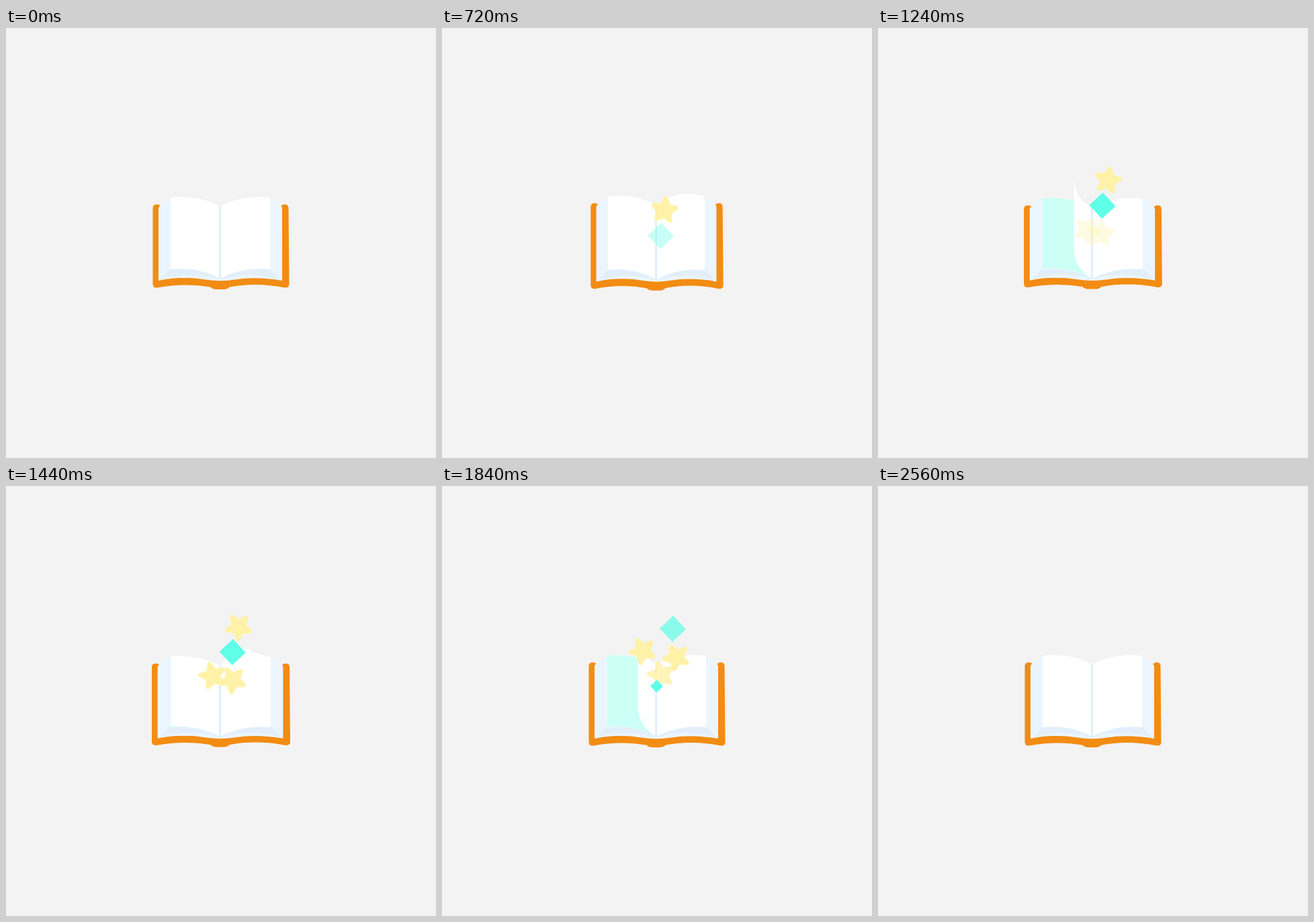
An HTML page with a canvas that plays this animation: 640x640 px, repeating every 2640 ms.

```html
<!DOCTYPE html>
<html lang="en">
<head>
<meta charset="utf-8">
<title>Magic book</title>
<style>
html, body { margin: 0; width: 100%; height: 100%; overflow: hidden; background: #f3f3f3; }
canvas { display: block; width: 640px; height: 640px; }
</style>
</head>
<body>
<canvas id="stage" width="640" height="640"></canvas>
<script>
const ctx = document.getElementById('stage').getContext('2d');
const LOOP = 2640, STEP = 40;
const MID = 319, HALF = 74;
const YELLOW = '#fff2a8', TEAL = [95, 255, 232], MINT = [204, 255, 246];

const clamp = v => Math.min(1, Math.max(0, v));
const ramp = (t, a, b) => clamp((t - a) / (b - a));
const smooth = u => u * u * (3 - 2 * u);
const mix = (a, b, u) => a + (b - a) * u;
const rgb = (a, b, u) => `rgb(${a.map((v, i) => Math.round(mix(v, b[i], u)))})`;

function fill(d, color, alpha = 1) {
  ctx.globalAlpha = alpha;
  ctx.fillStyle = color;
  ctx.fill(new Path2D(d));
  ctx.globalAlpha = 1;
}

// Squash and stretch: time, horizontal scale
const bounce = [[200, 1], [540, .89], [900, 1.054], [1180, 1.017], [1380, 1], [1500, 1.03], [1860, 1]];

function stretch(t) {
  for (let i = 1; i < bounce.length; i++) {
    const [t0, a] = bounce[i - 1], [t1, b] = bounce[i];
    if (t < t1) return mix(a, b, smooth(ramp(t, t0, t1)));
  }
  return 1;
}

const cover = 'M218.5 268Q218.5 262.5 224.5 262.5Q229 262.5 230.5 266V372H409V266Q410.5 262.5 415 262.5' +
  'Q420.5 262.5 420.5 268L421.5 381Q421.5 387 415 386.5Q372 378 333 385.5Q329 389 325 389H313Q308 389 304 385.5' +
  'Q266 379 225 386.5Q218.5 387 218.5 381Z';
const block = 'M227 269Q227 265 231 264Q237 256 245 253L319 266L393 253Q402 257 407 264Q411 265 411 269V376' +
  'Q372 369.5 341 374.5Q319 378 297 374.5Q264 368.5 227 376Z';
const shade = 'M230 374Q237 367 245 358Q288 354 319 373Q350 354 393 358Q401 367 408 374Q360 361 319 374Q275 361 230 374Z';
const leaf = side => {
  const x = u => MID + side * u;
  return `M${x(HALF)} 252.5Q${x(34)} 248 ${x(0)} 265.5V373Q${x(34)} 355 ${x(HALF)} 359Z`;
};

// One sheet turning from right (p = 0) to left (p = 1)
function sheet(p, color, alpha) {
  const a = p * Math.PI, sin = Math.sin(a), right = p < .5;
  const s = Math.pow(sin, right ? 5 : 1.8);
  const x = MID + HALF * Math.cos(a);
  const cx = mix(x, MID, .55 - .5 * s);
  const bulge = right ? 18 * Math.sin(2 * a) : 0;
  const lift = 32 * s;
  fill(`M${x} ${252.5 - lift}Q${cx} ${248.5 + 6 * s - bulge} ${MID} 265.5V373` +
    `Q${cx} ${355 + 6 * s} ${x} ${359 - lift}Z`, right ? '#fff' : color, right ? 1 : alpha);
}

function turn(t) {
  if (t <= 0 || t >= 916) return;
  const at = (delay, dur = 600) => smooth(ramp(t, delay, delay + dur));
  const settle = ramp(at(78), .65, .95);
  if (t > 51 && settle < 1) sheet(at(51), rgb(TEAL, MINT, settle), 1);
  if (settle < 1) sheet(at(0), '#ff94b6', .9);
  if (t > 78) sheet(at(78), rgb(TEAL, MINT, settle), mix(.7, 1, settle));
  if (t > 196) sheet(at(196, 720), '#fff', 1);
}

function book(t) {
  const sx = stretch(t), sy = 2 - sx - (sx > 1 ? (sx - 1) * .15 : 0);
  const cy = sy < 1 ? 358 : 326;
  ctx.save();
  ctx.translate(320, cy);
  ctx.scale(sx, sy);
  ctx.translate(-320, -cy);
  fill(cover, '#f28c13');
  fill(block, '#ebf5fe');
  fill(shade, '#e2effb');
  fill(leaf(-1), '#fff');
  fill(leaf(1), '#fff');
  const tint = Math.sin(Math.PI * ramp(t, 1140, 1340));
  if (tint > 0) fill('M319 267Q350 249 391 253V355Q350 352 319 371Z', '#f7fcfe', tint);
  turn(t - 626);
  turn(t - 1226);
  fill('M317.8 265H319.3V373H317.8Z', '#c7e3f9');
  ctx.restore();
}

function star() {
  const pt = i => {
    const r = i % 2 ? 12 : 25.5, a = i * Math.PI / 5 - Math.PI / 2;
    return [r * Math.cos(a), r * Math.sin(a)];
  };
  ctx.moveTo(...pt(-1));
  for (let i = 0; i < 10; i += 2) {
    ctx.arcTo(...pt(i), ...pt(i + 1), 3);
    ctx.lineTo(...pt(i + 1));
  }
}

function diamond(r) {
  ctx.moveTo(0, -r);
  ctx.lineTo(r, 0);
  ctx.lineTo(0, r);
  ctx.lineTo(-r, 0);
}

// Position and angle at time t0, speeds per ms, fade in and fade out; r marks a diamond
const sparks = [
  { t0: 1240, x: 334, y: 264.5, vx: .016, vy: -.0865, rot: 2, spin: 0, show: [640, 870], hide: [1780, 1980], r: 19.5 },
  { t0: 1240, x: 342, y: 227, vx: .021, vy: -.085, rot: 10, spin: .144, show: [400, 640], hide: [1500, 1700] },
  { t0: 1840, x: 326, y: 281, vx: .013, vy: -.1, rot: 58, spin: .15, show: [1570, 1900], hide: [2340, 2560] },
  { t0: 1640, x: 303, y: 264, vx: -.022, vy: -.093, rot: 16, spin: .15, show: [1160, 1400], hide: [2260, 2540] },
  { t0: 1640, x: 343, y: 272, vx: .028, vy: -.085, rot: 8, spin: .19, show: [1160, 1400], hide: [2300, 2560] },
  { t0: 1840, x: 319.5, y: 298, vx: -.004, vy: -.065, rot: 2, spin: 0, show: [1560, 1740], hide: [2340, 2560], r: 9.5 }
];

function spark(s, t) {
  const alpha = ramp(t, ...s.show) * (1 - ramp(t, ...s.hide));
  if (!alpha) return;
  const dt = t - s.t0;
  ctx.save();
  ctx.globalAlpha = alpha;
  ctx.translate(s.x + s.vx * dt, s.y + s.vy * dt);
  ctx.rotate((s.rot + s.spin * dt) * Math.PI / 180);
  ctx.beginPath();
  if (s.r) diamond(s.r); else star();
  ctx.closePath();
  ctx.fillStyle = s.r ? `rgb(${TEAL})` : YELLOW;
  ctx.fill();
  ctx.restore();
}

function draw(t) {
  ctx.fillStyle = '#f3f3f3';
  ctx.fillRect(0, 0, 640, 640);
  book(t);
  for (const s of sparks) spark(s, t);
}

const start = performance.now();
function tick() {
  const t = (performance.now() - start) % LOOP;
  draw(Math.floor(t / STEP) * STEP);
  requestAnimationFrame(tick);
}
tick();
</script>
</body>
</html>
```
